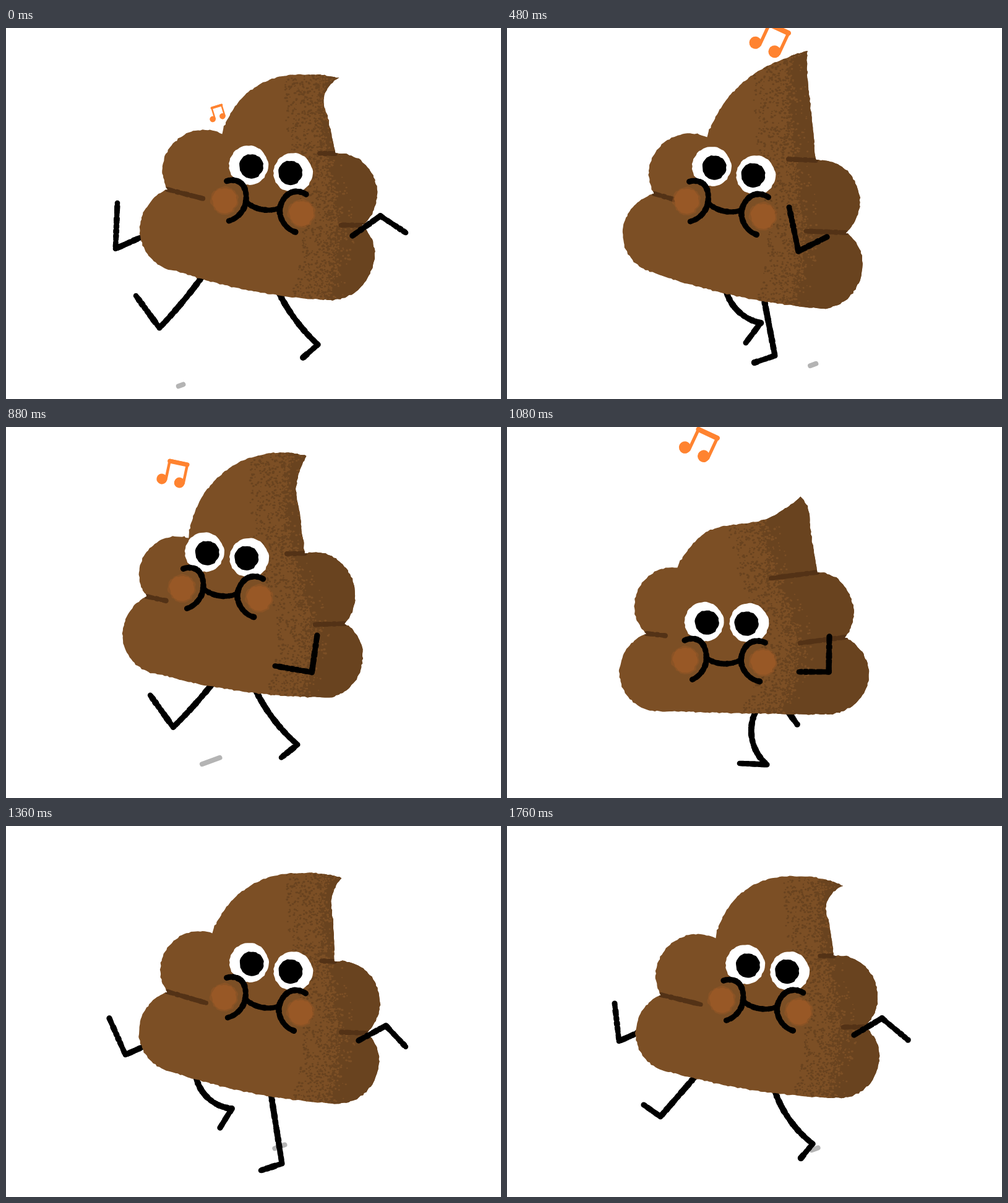
Animation of 800 by 600 pixels, one loop 1800 ms. Source, as an HTML page with a canvas:

```html
<!DOCTYPE html>
<html lang="en">
<head>
<meta charset="utf-8">
<title>Happy stroll</title>
<style>
html, body { margin: 0; width: 100%; height: 100%; overflow: hidden; background: #fff; }
canvas { display: block; width: 100vw; height: 100vh; }
</style>
</head>
<body>
<canvas id="stage" width="800" height="600"></canvas>
<script>
const LOOP = 1800, STEP = 40, TURN = Math.PI * 2;
const BROWN = '#7c4f25', DARK = '#69431f', CREASE = '#533216', CHEEK = '#985826', ORANGE = '#ff8330';
const ctx = document.getElementById('stage').getContext('2d');

// ---------- motion helpers ----------

// Periodic cubic through rows of numbers at the given times.
function spline(times, rows) {
  const n = times.length;
  const at = j => ({ t: times[(j + n) % n] + LOOP * Math.floor(j / n), row: rows[(j + n) % n] });
  return t => {
    let i = n - 1;
    while (i > 0 && times[i] > t) i--;
    const [a, b, c, d] = [at(i - 1), at(i), at(i + 1), at(i + 2)];
    const h = c.t - b.t, u = (t - b.t) / h, u2 = u * u, u3 = u2 * u;
    return b.row.map((v, k) => {
      const m0 = (c.row[k] - a.row[k]) / (c.t - a.t) * h;
      const m1 = (d.row[k] - v) / (d.t - b.t) * h;
      return v * (2 * u3 - 3 * u2 + 1) + m0 * (u3 - 2 * u2 + u) +
        c.row[k] * (3 * u2 - 2 * u3) + m1 * (u3 - u2);
    });
  };
}

function solve(m, rhs) {
  const n = rhs.length, a = m.map((r, i) => [...r, rhs[i]]);
  for (let i = 0; i < n; i++) {
    for (let j = 0; j < n; j++) {
      if (j === i) continue;
      const f = a[j][i] / a[i][i];
      for (let k = i; k <= n; k++) a[j][k] -= f * a[i][k];
    }
  }
  return a.map((r, i) => r[n] / r[i]);
}

// One slow turn plus four bounces per loop.
function basis(t) {
  const w = t / LOOP * TURN;
  return [1, Math.cos(w), Math.sin(w), Math.cos(4 * w), Math.sin(4 * w)];
}

// Turn-and-bounce fit, with the remainder eased between the poses.
function sway(times, rows) {
  const b = times.map(basis), ridge = [0, .05, .05, .05, .15];
  const normal = ridge.map((r, i) => ridge.map((_, j) =>
    b.reduce((s, v) => s + v[i] * v[j], i === j ? r : 0)));
  const coef = rows[0].map((_, k) => solve(normal, ridge.map((_, i) =>
    b.reduce((s, v, p) => s + v[i] * rows[p][k], 0))));
  const fit = t => { const q = basis(t); return coef.map(c => c.reduce((s, v, i) => s + v * q[i], 0)); };
  const rest = spline(times, rows.map((r, p) => {
    const f = fit(times[p]);
    return r.map((v, k) => v - f[k]);
  }));
  return t => { const r = rest(t); return fit(t).map((v, k) => v + r[k]); };
}

const pairs = row => Array.from({ length: row.length / 2 }, (_, i) => [row[2 * i], row[2 * i + 1]]);
const mix = (a, b, u) => a.map((v, i) => v + (b[i] - v) * u);
const polar = ([x, y], len, deg) => {
  const a = deg / 360 * TURN;
  return [x + len * Math.cos(a), y + len * Math.sin(a)];
};

// ---------- poses ----------

const POSES = [0, 240, 480, 680, 1080, 1360, 1760];

// Left notch, tip, upper and lower right notch, base right, base left, lower left notch.
const corners = sway(POSES, [
  [349,171, 538,81, 532,203, 576,319, 520,440, 275,393, 261,261],
  [291,233, 511,124, 507,233, 548,331, 520,447, 235,456, 216,342],
  [323,176, 485,37, 499,214, 548,331, 512,454, 235,395, 238,268],
  [254,235, 469,98, 471,222, 525,318, 510,438, 230,461, 197,346],
  [275,227, 475,113, 501,235, 546,340, 515,465, 235,459, 226,334],
  [333,173, 543,84, 531,219, 583,335, 535,449, 270,398, 261,268],
  [337,181, 544,97, 528,210, 578,325, 540,440, 265,398, 249,273]
]);

// Two points on the crown's back, one on its front.
const crown = sway(POSES, [
  [412,90, 480,75, 514,113], [325,162, 400,136, 501,150], [385,85, 433,56, 486,80], [285,145, 350,116, 458,140],
  [315,175, 425,146, 484,125], [405,91, 470,76, 527,113], [392,99, 465,81, 516,126]
]);

// Crease lengths: lower left, upper right, lower right.
const folds = sway(POSES, [
  [59,25,35], [48,57,62], [33,44,65], [22,60,63], [30,75,73], [65,21,41], [66,22,35]
]);

// Point between the eyes and tilt in degrees.
const face = sway(POSES, [
  [428,228,9.5], [365.5,306.5,-.8], [366.5,231,11.2], [317.5,287.5,-4], [355,316,1.6], [428.5,228,11.2], [421,229.5,8.7]
]);

// Shoulder, elbow, hand.
const rightArm = spline(POSES, [
  [560,336, 605,304, 646,331], [536,341, 561,386, 579,437], [517,338, 471,361, 456,290], [495,337, 480,383, 427,359],
  [521,339, 520,396, 472,396], [570,347, 614,323, 646,357], [561,338, 606,311, 648,346]
]);

// Elbow, hand.
const leftArm = spline([0, 80, 240, 1080, 1360, 1620, 1760], [
  [177,357, 180,283], [164,354, 192,288], [230,385, 245,330], [240,375, 245,335],
  [193,370, 167,311], [174,372, 141,318], [181,348, 174,287]
]);

// Hip, heel, toe, bend. The wide poses return half a loop later, shifted by the turn.
function legTrack(rows, strideShift, stepShift) {
  const shift = (row, d) => row.map((v, i) => i < 6 && i % 2 === 0 ? v + d : v);
  const [a, b, c, d, e, f, g] = rows;
  return spline([...POSES, 900, 1580].sort((x, y) => x - y),
    [a, b, c, d, shift(a, strideShift), e, f, shift(d, stepShift), g]);
}
const leftLeg = legTrack([
  [320,398, 248,485, 210,433, -2], [371,446, 393,536, 349,548, 24], [355,428, 410,477, 386,509, 10],
  [408,442, 332,532, 305,519, 8], [402,460, 420,546, 376,544, 15], [307,405, 365,457, 346,488, 13],
  [306,403, 248,470, 221,451, 0]
], 25, -25);
const rightLeg = legTrack([
  [440,426, 504,512, 480,533, 5], [405,445, 470,449, 500,466, 16], [415,436, 433,530, 400,541, 0],
  [383,447, 460,508, 428,523, 10], [440,440, 456,463, 469,481, 0], [428,432, 446,546, 412,557, 0],
  [432,426, 494,514, 475,537, 8]
], -33, 34);

// x, y, scale, tilt by age.
const noteMove = spline([0, 240, 480, 680, 780], [
  [342,145,.57,-17], [354,67,1,12], [417,31,1.18,25], [424,-3,1.33,3], [424,-24,1.4,-4]
]);

// Ground marks: start, duration, first centre.
const marks = [
  [-28,343,266,584], [48,480,312,612], [480,400,229,569], [760,300,250,570], [1110,305,276,580], [1440,360,317,589]
];

// ---------- drawing helpers ----------

const noise = i => { const s = Math.sin(i * 127.1 + 11.7) * 43758.5453; return (s - Math.floor(s)) * 2 - 1; };
const rand = i => (noise(i) + 1) / 2;

function unit(x, y) { const l = Math.hypot(x, y) || 1; return [x / l, y / l]; }

// Samples a smooth line through the points with arc-like tangents.
function curve(pts, step = 4) {
  const last = pts.length - 1, len = [], dir = [];
  for (let i = 0; i < last; i++) {
    const dx = pts[i + 1][0] - pts[i][0], dy = pts[i + 1][1] - pts[i][1];
    len.push(Math.hypot(dx, dy));
    dir.push(unit(dx, dy));
  }
  const tan = pts.map((_, i) => i && i < last && unit(
    dir[i - 1][0] * len[i] + dir[i][0] * len[i - 1], dir[i - 1][1] * len[i] + dir[i][1] * len[i - 1]));
  const mirror = (t, u) => {
    if (!t) return u;
    const d = 2 * (t[0] * u[0] + t[1] * u[1]);
    return [d * u[0] - t[0], d * u[1] - t[1]];
  };
  tan[0] = mirror(tan[1], dir[0]);
  tan[last] = mirror(tan[last - 1], dir[last - 1]);
  const out = [];
  for (let i = 0; i < last; i++) {
    const n = Math.max(1, Math.ceil(len[i] / step)), h = len[i] * .345;
    for (let k = 0; k < n; k++) {
      const u = k / n, v = 1 - u;
      out.push([0, 1].map(c => v * v * v * pts[i][c] + 3 * v * v * u * (pts[i][c] + tan[i][c] * h) +
        3 * v * u * u * (pts[i + 1][c] - tan[i + 1][c] * h) + u * u * u * pts[i + 1][c]));
    }
  }
  out.push(pts[last]);
  return out;
}

// Point beside the line a-b; both distances are parts of its length.
function beside(a, b, along, out) {
  const dx = b[0] - a[0], dy = b[1] - a[1];
  return [a[0] + dx * along + dy * out, a[1] + dy * along - dx * out];
}

const lobe = (a, b, bulge) => curve([
  a, beside(a, b, .15, bulge * .66), beside(a, b, .5, bulge), beside(a, b, .84, bulge * .65), b
]);

function roughPath(pts, amount) {
  const p = new Path2D();
  pts.forEach(([x, y], i) => p.lineTo(x + noise(i) * amount, y + noise(i + 500) * amount));
  p.closePath();
  return p;
}

function blob(x, y, r, color, amount = .7) {
  const n = Math.round(r * 1.6);
  const ring = Array.from({ length: n }, (_, i) => polar([x, y], r, i / n * 360));
  ctx.fillStyle = color;
  ctx.fill(roughPath(ring, amount));
}

// Uneven round brush along a polyline.
function brush(pts, width, color = '#000') {
  ctx.fillStyle = color;
  ctx.beginPath();
  let n = 0;
  for (let i = 0; i < pts.length - 1; i++) {
    const a = pts[i], b = pts[i + 1];
    const k = Math.max(1, Math.ceil(Math.hypot(b[0] - a[0], b[1] - a[1]) / 2));
    for (let j = 0; j <= k; j++, n++) {
      const [x, y] = mix(a, b, j / k), r = width / 2 + noise(n >> 1) * .55;
      ctx.moveTo(x + r, y);
      ctx.arc(x, y, r, 0, TURN);
    }
  }
  ctx.fill();
}

function line(pts, width, color) {
  ctx.lineWidth = width;
  ctx.strokeStyle = color;
  ctx.beginPath();
  pts.forEach(p => ctx.lineTo(...p));
  ctx.stroke();
}

// ---------- parts ----------

function drawMarks(t) {
  for (const [from, span, x, y] of marks) {
    const p = (t - from) / span;
    if (p <= 0 || p >= 1) continue;
    const centre = [x + 203 * p, y - 75 * p], half = 16 * Math.sin(Math.PI * p);
    line([polar(centre, half, 160), polar(centre, half, -20)], 8, '#b4b4b4');
  }
}

function drawLeg(row) {
  const [hip, heel, toe] = pairs(row.slice(0, 6));
  const size = Math.hypot(heel[0] - hip[0], heel[1] - hip[1]);
  const knee = beside(hip, heel, .5, -row[6] / size);
  brush([...curve([hip, knee, heel]), toe], 9.5);
}

function drawLeftArm(t) {
  const [elbow, hand] = pairs(leftArm(t));
  brush([[elbow[0] + 60, elbow[1] - 27], elbow, hand], 9);
}

function drawShade(edge) {
  const side = edge.map(([x, y]) => [x + 7, y]);
  ctx.fillStyle = DARK;
  ctx.fill(roughPath([...side, [720, edge[edge.length - 1][1] + 30], [720, edge[0][1] - 40]], 3));
  const specks = (count, seed, color, reach, power) => {
    ctx.fillStyle = color;
    ctx.beginPath();
    for (let i = seed; i < seed + count; i++) {
      const [x, y] = edge[Math.floor(rand(i) * edge.length)];
      const px = x + 7 + reach * rand(i + 3000) ** power, py = y + noise(i + 6000) * 4;
      const r = .8 + rand(i + 9000) * 1.1;
      ctx.moveTo(px + r * 1.2, py);
      ctx.ellipse(px, py, r * 1.2, r, 0, 0, TURN);
    }
    ctx.fill();
  };
  specks(1250, 100, DARK, -58, 1.7);
  specks(260, 20000, BROWN, 26, 2);
}

function drawBody(t) {
  const [left, tip, right, lowRight, baseRight, baseLeft, lowLeft] = pairs(corners(t));
  const [back, top, front] = pairs(crown(t));
  const tilt = face(t)[2], low = (1 - basis(t)[3]) / 2;
  const shape = roughPath([
    curve([left, back, top, tip]),
    curve([tip, front, mix(front, right, .4), right]),
    lobe(right, lowRight, .36 - .07 * low),
    lobe(lowRight, baseRight, .33 + .1 * low),
    curve([baseRight, beside(baseRight, baseLeft, .5, .035 * (1 - low)), baseLeft]),
    lobe(baseLeft, lowLeft, .39),
    lobe(lowLeft, left, .36)
  ].flatMap(part => part.slice(0, -1)), .9);
  ctx.fillStyle = BROWN;
  ctx.fill(shape);

  const [l, r, s] = folds(t);
  const rightEnd = polar(right, -r, tilt - 9), lowEnd = polar(lowRight, -s, tilt - 9);
  ctx.save();
  ctx.clip(shape);
  drawShade(curve([
    [rightEnd[0] - 5 - 30 * low, tip[1] - 10], [rightEnd[0] + 2, rightEnd[1]],
    [lowEnd[0] - 10, lowEnd[1]], [lowEnd[0] - 35 - 22 * low, baseRight[1] + 8]
  ]));
  brush([lowLeft, polar(lowLeft, l, tilt + 5)], 7.5, CREASE);
  brush([right, rightEnd], 7.5, CREASE);
  brush([lowRight, lowEnd], 7.5, CREASE);
  ctx.restore();
}

function drawFace(t) {
  const [x, y, tilt] = face(t);
  ctx.save();
  ctx.translate(x, y);
  ctx.rotate(tilt / 360 * TURN);
  for (const cx of [-65.5, 60.5]) {
    ctx.globalAlpha = .5;
    blob(cx, 62.5, 22.5, CHEEK, 1.4);
    ctx.globalAlpha = 1;
    blob(cx, 62.5, 20, CHEEK, 1.2);
  }
  for (const s of [-1, 1]) {
    blob(s * 36.4, 0, 31.7, '#fff');
    blob(s * 32, .8, 19.6, '#000');
  }
  brush(curve([[-67, 31], [-47, 29], [-31, 60], [-53, 94]]), 9);
  brush(curve([[63, 31], [43, 30], [25, 60], [56, 94]]), 9);
  brush(curve([[-31, 59], [0, 67], [23, 61]]), 8.5);
  ctx.restore();
}

function drawNote(age, second) {
  if (age < 0 || age > 760) return;
  let [x, y, size, tilt] = noteMove(age);
  if (second) {
    x = 258 + (x - 342) * .67;
    y += 40 * Math.max(0, 1 - age / 480);
  }
  ctx.save();
  ctx.globalAlpha = 1 - Math.max(0, age - 500) / 700;
  ctx.translate(x, y);
  ctx.rotate(tilt / 360 * TURN);
  ctx.scale(size, size);
  ctx.fillStyle = ORANGE;
  for (const cx of [-14.5, 14.5]) {
    ctx.beginPath();
    ctx.arc(cx, 0, 8.5, 0, TURN);
    ctx.fill();
  }
  line([[-8, 0], [-8, -32], [21, -32], [21, 0]], 4.5, ORANGE);
  line([[-8, -31], [21, -31]], 7, ORANGE);
  ctx.restore();
}

function draw(t) {
  ctx.fillStyle = '#fff';
  ctx.fillRect(0, 0, 800, 600);
  ctx.lineCap = ctx.lineJoin = 'round';
  drawMarks(t);
  drawLeg(rightLeg(t));
  drawLeg(leftLeg(t));
  drawLeftArm(t);
  drawBody(t);
  drawFace(t);
  brush(pairs(rightArm(t)), 9);
  drawNote(t, false);
  drawNote(t - 640, true);
}

const start = performance.now();
let shown = -1;
function tick() {
  const t = Math.floor((performance.now() - start) % LOOP / STEP) * STEP;
  if (t !== shown) draw(shown = t);
  requestAnimationFrame(tick);
}
tick();
</script>
</body>
</html>
```
